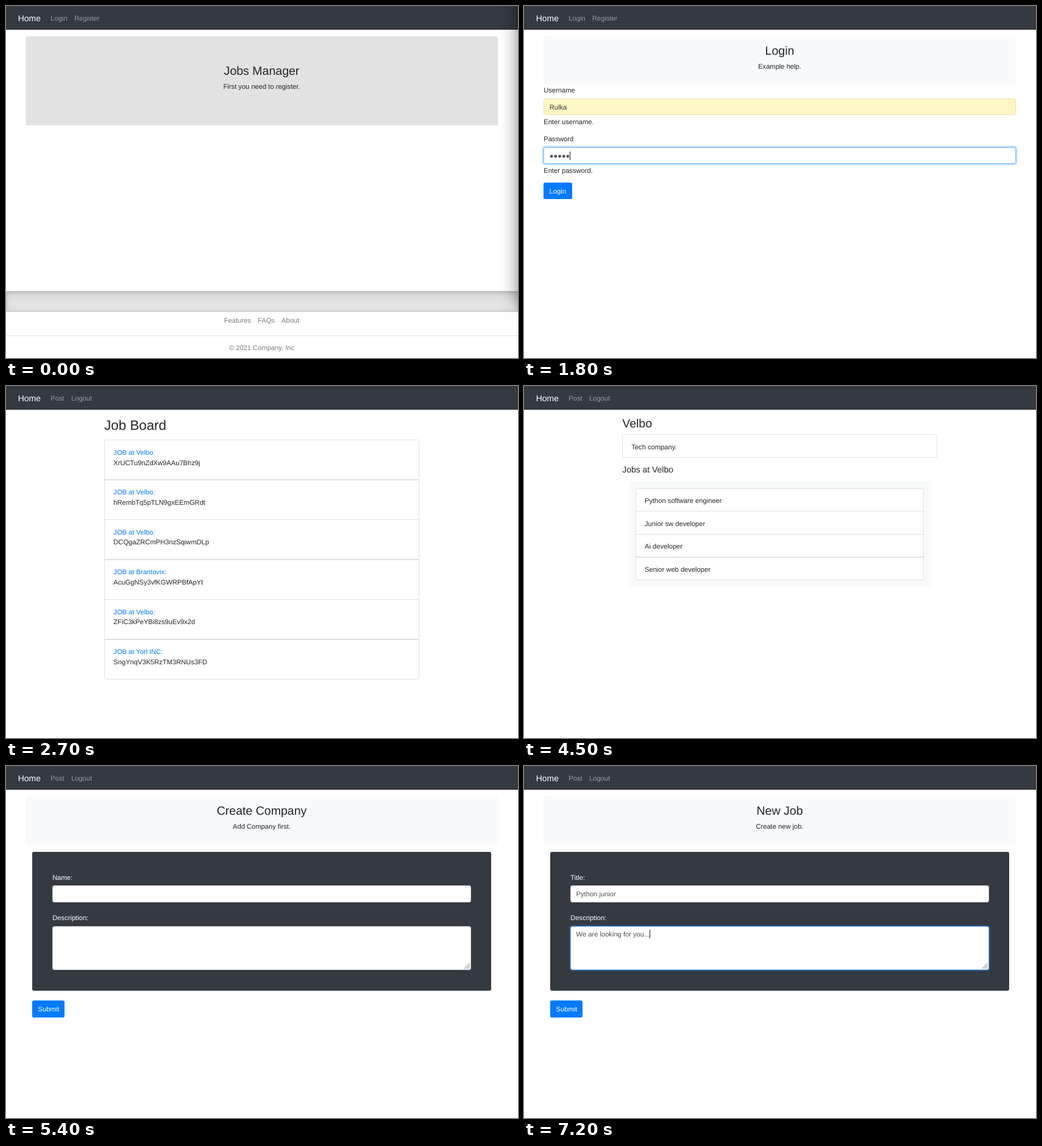
Write an HTML page that moves like this. It is 840 by 578 pixels and loops after 8000 ms.

```html
<!DOCTYPE html>
<html lang="en">
<head>
<meta charset="utf-8">
<title>Jobs Manager</title>
<style>
  html, body { margin: 0; width: 100%; height: 100%; overflow: hidden; background: #fff; }
  svg { display: block; }
  text { font: 11.17px "Liberation Sans", Arial, sans-serif; text-rendering: geometricPrecision; white-space: pre; }
  .divider {
    box-sizing: border-box; height: 34px; background: rgba(0,0,0,.1);
    border: solid rgba(0,0,0,.15); border-width: 1px 0;
    box-shadow: inset 0 5.6px 16.7px rgba(0,0,0,.1), inset 0 1.4px 5.6px rgba(0,0,0,.15);
  }
  .edge { position: absolute; left: 840px; top: -20px; width: 60px; height: 510px; box-shadow: 0 0 28px rgba(0,0,0,.5); }
</style>
</head>
<body>
<svg id="stage" width="840" height="578" viewBox="0 0 840 578"></svg>
<script>
const DARK = '#343a40', INK = '#212529', BLUE = '#007bff', LIGHT = '#f8f9fa', LINE = '#dfdfdf';
const FRAME_MS = 900, LOOP_MS = 8000;
const COMPANY = 'Velbo', USER = 'Rulka';

const text = (x, y, str, fill = INK, size = 11.17, anchor = 'start') =>
  `<text x="${x}" y="${y}" fill="${fill}" text-anchor="${anchor}" style="font-size:${size}px">${str}</text>`;
const centered = (y, str, size, fill) => text(419.5, y, str, fill, size, 'middle');
const rect = (x, y, w, h, fill, r = 0, stroke = 'none', sw = 1) =>
  `<rect x="${x}" y="${y}" width="${w}" height="${h}" rx="${r}" fill="${fill}" stroke="${stroke}" stroke-width="${sw}"/>`;
const path = (d, stroke, sw = 1) => `<path d="${d}" fill="none" stroke="${stroke}" stroke-width="${sw}"/>`;
const caret = (x, y) => path(`M${x} ${y}v14`, '#222');

const nav = (...links) => rect(0, 0, 840, 39, DARK) + text(19.7, 25, 'Home', '#fff', 13.96) +
  text(73.3, 24, links[0], '#999c9f') + text(links[0] === 'Login' ? 112 : 107, 24, links[1], '#999c9f');
const guestNav = nav('Login', 'Register');
const userNav = nav('Post', 'Logout');

const banner = (title, help) =>
  rect(32, 50, 775, 79, LIGHT) + centered(80, title, 19.55) + centered(103, help);

const button = (x, y, w, h, label) =>
  rect(x, y, w, h, BLUE, 2.8) + text(x + 9.6, y + h / 2 + 4.3, label, '#fff');

// Input box with optional autofill colour or focus ring
function box(x, y, w, h, state) {
  const ring = state === 'focus' ? rect(x - 1.5, y - 1.5, w + 3, h + 3, 'none', 4, 'rgba(0,123,255,.28)', 2.4) : '';
  const [fill, stroke] = { focus: ['#fff', '#80bdff'], filled: ['#fff6c4', '#e8dfb0'] }[state] || ['#fff', '#ced4da'];
  return ring + rect(x, y, w, h, fill, 2.8, stroke);
}

const dots = (y, fill) => [0, 1, 2, 3, 4].map(i =>
  `<circle cx="${45.2 + i * 6.65}" cy="${y}" r="2.4" fill="${fill}"/>`).join('');

function field(row, label, help, value, state) {
  const y = 152 + row * 80;
  const color = state === 'filled' ? '#3b3b36' : '#495057';
  return text(32.2, y - 10, label) + box(32.5, y + .5, 774, 26, state) +
    (value ? text(41.7, y + 17.5, value, color) : dots(y + 14.8, color)) +
    (state === 'focus' ? caret(75.5, y + 7) : '') + text(32.2, y + 42, help);
}

// Bordered list group; whole-number rules are two pixels thick
const list = (x, w, ys) => {
  const top = ys[0], bottom = ys[ys.length - 1];
  return rect(x + .5, top, w, bottom - top, '#fff', 2.8, LINE) +
    ys.slice(1, -1).map(y => path(`M${x} ${y}h${w + 1}`, LINE, y % 1 ? 1 : 2)).join('');
};

const jobs = [
  [COMPANY, 'XrUCTu9nZdXw9AAu7Bhz9j'], [COMPANY, 'hRembTq5pTLN9gxEEmGRdt'],
  [COMPANY, 'DCQgaZRCmPH3nzSqiwmDLp'], ['Brantovix', 'AcuGgNSy3vfKGWRPBfApYt'],
  [COMPANY, 'ZFiC3kPeYBi8zs9uEv9x2d'], ['Yorl INC', 'SngYnqV3K5RzTM3RNUs3FD'],
];
const roles = ['Python software engineer', 'Junior sw developer', 'Ai developer', 'Senior web developer'];

const darkForm = (title, help, label, name, about, caretX) => userNav + banner(title, help) +
  rect(43, 141, 753, 228, DARK, 3) +
  text(76.3, 187, label, '#fff') + box(76.5, 196.5, 686, 27) + text(85.6, 214, name, '#495057') +
  text(76.3, 253, 'Description:', '#fff') + box(76.5, 263.5, 686, 71, caretX && 'focus') +
  text(85.6, 280, about, '#495057') + (caretX ? caret(caretX, 269) : '') +
  path('M751.5 333l9.5-9.5M754.5 333l6.5-6.5M757.5 333l3.5-3.5', '#777') +
  button(43, 385, 53, 28, 'Submit');

const home = guestNav + rect(32, 50, 775, 146, '#e2e2e2', 3.5) +
  centered(113, 'Jobs Manager', 19.55) + centered(136, 'First you need to register.') +
  '<foreignObject y="468" width="840" height="34"><div class="divider"></div></foreignObject>' +
  text(357.7, 520, 'Features', '#777b7f') + text(413, 520, 'FAQs', '#777b7f') + text(452, 520, 'About', '#777b7f') +
  path('M0 541.5h840', LINE) + centered(565, '© 2021 Company, Inc', 11.17, '#777b7f') +
  '<foreignObject width="840" height="578"><div class="edge"></div></foreignObject>';

const register = guestNav + banner('Register', 'Example help.') +
  field(0, 'Email', 'Enter email.', 'sampler@sampler.zzz') +
  field(1, 'Username', 'Enter username.', USER, 'filled') +
  field(2, 'Password', 'Enter password.', '', 'filled') +
  field(3, 'Confirm Password', 'Enter password.', '', 'focus') +
  button(32, 450, 61, 27, 'Register');

const login = guestNav + banner('Login', 'Example help.') +
  field(0, 'Username', 'Enter username.', USER, 'filled') +
  field(1, 'Password', 'Enter password.', '', 'focus') +
  button(32, 290, 47, 27, 'Login');

const board = userNav + text(161.2, 72, 'Job Board', INK, 22.34) +
  list(161, 516, [88.5, 154, 219.5, 285, 350.5, 416, 481.5]) +
  jobs.map(([company, code], i) => {
    const y = 113 + i * 65.45;
    return text(176.3, y, `JOB at ${company}:`, BLUE) + text(176.3, y + 16.5, code);
  }).join('');

const job = userNav + text(161.2, 68, roles[0], INK, 19.55) +
  list(161, 516, [79.5, 117.5]) + text(176.3, 104, jobs[0][1]) +
  text(161.2, 141, `JOB at ${COMPANY}`, BLUE);

const company = userNav + text(161.2, 68, COMPANY, INK, 19.55) +
  list(161, 516, [79.5, 117.5]) + text(176.3, 104, 'Tech company.') +
  text(161.2, 142, `Jobs at ${COMPANY}`, INK, 13.96) + rect(172, 157, 495, 173, LIGHT) +
  list(183, 472, [168.5, 205.5, 243.5, 281, 318.5]) +
  roles.map((role, i) => text(198, 192 + i * 37.6, role)).join('');

const companyForm = (...values) => darkForm('Create Company', 'Add Company first.', 'Name:', ...values);

const pages = [
  home, register, login, board, job, company,
  companyForm('', ''), companyForm(COMPANY, 'Tech company.', 162.5),
  darkForm('New Job', 'Create new job.', 'Title:', 'Python junior', 'We are looking for you...', 206.5),
];

const stage = document.getElementById('stage');
let shown = -1;
function draw() {
  const page = Math.floor(performance.now() % LOOP_MS / FRAME_MS);
  if (page !== shown) stage.innerHTML = pages[shown = page];
  requestAnimationFrame(draw);
}
draw();
</script>
</body>
</html>
```
